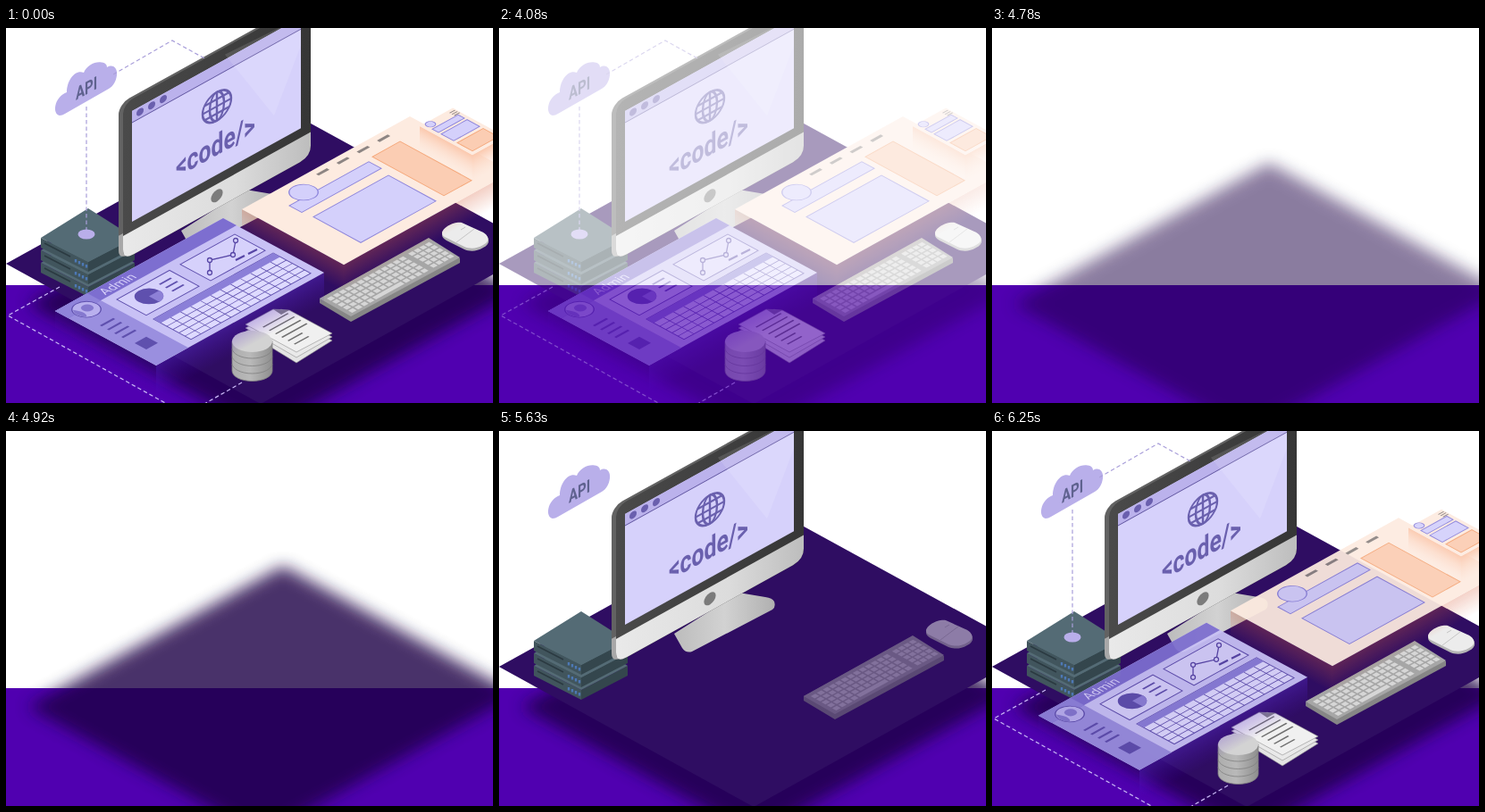
Recreate the animation shown at these times as an HTML page. Size 545 by 420 pixels, loop 6320 ms.

```html
<!DOCTYPE html>
<html lang="en">
<head>
<meta charset="utf-8">
<style>
html, body { margin: 0; height: 100%; overflow: hidden; background: #fff }
svg { display: block; width: 100vw; height: 100vh }
text { font-family: Roboto, Arial, sans-serif; font-weight: 700 }
</style>
</head>
<body>
<svg viewBox="0 0 545 420">
<defs>
  <filter id="blur" x="-20%" y="-20%" width="140%" height="140%"><feGaussianBlur stdDeviation="9"/></filter>
  <linearGradient id="chin"><stop stop-color="#e9e9e9"/><stop offset=".6" stop-color="#dcdcdc"/><stop offset="1" stop-color="#bdbdbd"/></linearGradient>
  <linearGradient id="bezel"><stop stop-color="#4a4a4a"/><stop offset="1" stop-color="#363636"/></linearGradient>
  <linearGradient id="stand"><stop stop-color="#bcbcbc"/><stop offset=".5" stop-color="#d2d2d2"/><stop offset="1" stop-color="#b0b0b0"/></linearGradient>
  <linearGradient id="disk"><stop stop-color="#adadad"/><stop offset=".45" stop-color="#b9b9b9"/><stop offset="1" stop-color="#8e8e8e"/></linearGradient>
  <linearGradient id="violet" x2="0" y2="1"><stop stop-color="#5a2cd0" stop-opacity=".4"/><stop offset="1" stop-color="#4a10c0" stop-opacity="0"/></linearGradient>
  <linearGradient id="ember" x2="0" y2="1"><stop stop-color="#d8603c" stop-opacity=".3"/><stop offset="1" stop-color="#d8603c" stop-opacity="0"/></linearGradient>
  <linearGradient id="peach" x2="0" y2="1"><stop stop-color="#fbc8ad"/><stop offset="1" stop-color="#fddfd0" stop-opacity="0"/></linearGradient>
</defs>
<rect y="288" width="545" height="132" fill="#5000b0"/>
<g id="scene">
  <path id="shadow" d="M24 309 310 151 572 295 286 453z" fill="#1f0645" filter="url(#blur)"/>
  <path id="floor" d="M0 264 312 91 597 247 285 421z" fill="#2f0d62"/>

  <g id="server"></g>

  <g id="monitor">
    <path d="M196 227 205 243Q209 249 216 247L306 200Q310 197 308 191 306 187 298 186L268 181z" fill="url(#stand)"/>
    <g transform="matrix(1 -.5545 0 1 131 0)">
      <rect x="-5" y="82.500" width="210" height="175" rx="12" fill="#626262"/>
      <path d="M-5 230h20v27h-9q-11 0-11-11z" fill="#a8a8a8"/>
      <rect y="85" width="210" height="175" rx="11" fill="url(#bezel)"/>
      <path d="M0 233h210v15q0 12-12 12H12q-12 0-12-12z" fill="url(#chin)"/>
      <path d="M10 98.500h189v124H10z" fill="#d6d1fb"/>
      <path d="M10 98.500h189v13H10z" fill="#bbb2ec"/>
      <path d="M10 111.500h189" stroke="#5f549f"/>
      <g fill="#6a5fae"><circle cx="19" cy="104.500" r="4"/><circle cx="32" cy="104.500" r="4"/><circle cx="45" cy="104.500" r="4"/></g>
      <path d="M114 93 169 192 199 130V98z" fill="#fff" opacity=".12"/>
      <g fill="none" stroke="#6a60ae" stroke-width="2.400">
        <circle cx="105" cy="146" r="16"/><ellipse cx="105" cy="146" rx="8" ry="16"/>
        <path d="M105 130v32M89 146h32M92 138h26M92 154h26"/>
      </g>
      <circle cx="105" cy="246" r="6.600" fill="#7b7b7b"/>
    </g>
    <text transform="matrix(.75 -.416 0 1 190 168)" font-size="33" fill="#6a60ae">&lt;code/&gt;</text>
  </g>

  <g id="cloud">
    <path d="M60 98C52 97 53 78 68 72 68 58 78 46 87 50 90 42 100 37 107 38.500 112 39 113 42 113 44 120 40 125 45 124 53 123 60 120 65 115 68L66 96Q63 98 60 98z" fill="#b9afea"/>
    <text transform="matrix(.75 -.416 0 1 78 81)" font-size="20" fill="#5f628f">API</text>
  </g>

  <g id="keys">
    <path d="M351 303 473 236 508 258V263L386 329 351 308z" fill="#868686"/>
    <path d="M351 303 473 235 508 257 386 323z" fill="#a6a6a6"/>
    <path id="caps" transform="matrix(1 -.5532 1 .56 351 303)" fill="#d6d6d6"/>
    <path d="M488 232C488 224 503 217 510 219L532 229C542 233 543 242 534 246 526 251 518 250 513 248L493 238Q488 235 488 232z" fill="#b5b5b5"/>
    <path d="M488 230C488 223 503 216 510 218L532 228C541 232 542 239 534 243 526 248 518 247 513 245L493 235Q488 233 488 230z" fill="#ececec"/>
    <path d="M504 240 524 225M509 226 514 223" fill="none" stroke="#c4c4c4"/>
  </g>

  <g id="docs">
    <g stroke="#8f8f8f" stroke-width=".6">
      <path d="M268 340 308 319 365 350 325 375z" fill="#e4e4e4"/>
      <path d="M268 336 308 315 365 346 325 369z" fill="#e9e9e9"/>
      <path d="M268 332 299 315 317 316 365 342 325 363z" fill="#f0f0f0"/>
    </g>
    <path d="M299 315 317 316 308 321z" fill="#858585"/>
    <path id="lines" transform="matrix(1 -.5532 1 .545 268 332)" fill="#707070"/>
    <g id="db"></g>
  </g>

  <g id="links" fill="none" stroke="#a99fda" stroke-width="1.200" stroke-dasharray="4.500 3">
    <path d="M90 88V226M120 52 186 14 224 35"/>
    <path d="M60 290 2 322 180 421M264 397 222 421" stroke="#c9b8f5"/>
    <ellipse cx="90" cy="231" rx="9.500" ry="5.500" fill="#b9aeea" stroke="none"/>
  </g>

  <g id="page">
    <rect transform="matrix(1 .545 0 1 264 203)" width="114" height="30" fill="url(#ember)"/>
    <rect transform="matrix(1 -.5532 0 1 378 265)" width="188" height="30" fill="url(#ember)"/>
    <g id="pageTop" transform="matrix(1 -.5532 1 .545 264 203)"></g>
    <rect transform="matrix(1 .545 0 1 463 110)" width="59" height="26" fill="url(#peach)"/>
    <rect transform="matrix(1 -.5532 0 1 522 142)" width="37" height="30" fill="url(#peach)"/>
    <g id="miniTop" transform="matrix(1 -.5532 1 .545 463 110)"></g>
  </g>

  <g id="admin">
    <rect transform="matrix(1 .54 0 1 55 317)" width="113" height="30" fill="url(#violet)" opacity=".25"/>
    <rect transform="matrix(1 -.5532 0 1 168 378)" width="188" height="36" fill="url(#violet)"/>
    <g id="adminTop" transform="matrix(1 -.5532 1 .54 55 317)"></g>
    <g fill="none" stroke="#5746a6" stroke-width="1.300">
      <path d="M228 274V260L254 254 257 238"/>
      <g fill="#d6d1fb"><circle cx="228" cy="274" r="2.500"/><circle cx="228" cy="260" r="2.500"/><circle cx="254" cy="254" r="2.500"/><circle cx="257" cy="238" r="2.500"/></g>
      <path d="M257 260 267 255M271 253 281 248" stroke-width="2.200"/>
    </g>
  </g>
</g>
</svg>
<script>
const $ = id => document.getElementById(id);
const box = (x, y, w, h) => `M${x} ${y}h${w}v${h}h${-w}z`;
const rect = (x, y, w, h, fill, stroke = 'none') => `<path d="${box(x, y, w, h)}" fill="${fill}" stroke="${stroke}"/>`;
const disc = (x, y, r, fill, stroke = 'none') => `<circle cx="${x}" cy="${y}" r="${r}" fill="${fill}" stroke="${stroke}"/>`;
const list = (n, f) => Array.from({ length: n }, (_, i) => f(i)).join('');

$('server').innerHTML = list(3, i => {
  const y = 27 - i * 14;
  return `<g transform="translate(0 ${y})">
    <path d="M39 236 92 263V274L39 247z" fill="#41555d"/>
    <path d="M92 263 144 236V247L92 274z" fill="#34464d"/>
    <path d="M39 236 92 203 144 236 92 263z" fill="#546b75"/>
    <path d="M43 242 72 257" stroke="#2b3a41" stroke-width="1.500"/>
    <path d="M78 260v3.500M82 262v3.500M86 264v3.500M90 266v3.500" stroke="#4d78b4" stroke-width="2.400"/></g>`;
});

$('caps').setAttribute('d', list(5, r =>
  list(13, c => r == 4 && c > 3 && c < 9 ? '' : box(4 + c * 6.7, 4 + r * 6, 5, 4.4)) +
  list(4, c => box(95 + c * 6.2, 4 + r * 6, 4.8, 4.4))) + box(30.8, 28, 31.8, 4.4));

$('lines').setAttribute('d', list(6, i => box(7, 12 + i * 7, i > 3 ? 16 : 28, 1.5)));

$('db').innerHTML = list(4, i => {
  const y = 384 - i * 8.5;
  return `<path d="M253 ${y - 8}V${y}a22.500 11.500 0 0 0 45 0V${y - 8}z" fill="url(#disk)" stroke="#808080" stroke-width=".8"/>`;
}) + '<ellipse cx="275.500" cy="351" rx="22.500" ry="12" fill="#d3d3d3"/>';

const blue = '#d4d0fb', rim = '#8f87dc', peach = '#fbcdb3', orange = '#f5a97c';
$('pageTop').innerHTML = rect(0, 0, 188, 114, '#fdebe0') +
  list(4, i => rect(77 + i * 22.7, 6, 12, 3, '#8d8583')) +
  rect(30, 23, 89, 14, blue, rim) + disc(51.5, 17.5, 11.5, blue, rim) +
  rect(32, 48, 84, 53, blue, rim) + rect(126, 20, 31, 80, peach, orange);

$('miniTop').innerHTML = rect(0, 0, 37, 59, '#fdebe0') +
  list(3, i => rect(30, 3 + i * 2.6, 6, 1, '#8d8583')) +
  rect(4, 10, 29, 7, blue, rim) + disc(8, 4, 4, blue, rim) +
  rect(4, 20, 29, 14, blue, rim) + rect(4, 38, 29, 17, peach, orange);

const ink = '#5f50ae', pale = '#d6d1fb';
$('adminTop').innerHTML = rect(0, 0, 188, 113, '#c8c1f5') +
  rect(0, 0, 36, 113, '#9a8fdf') + rect(0, 0, 188, 15, '#7d6ed0') + rect(0, 0, 36, 15, '#8f83da') +
  '<text x="44" y="12" font-size="12.500" style="font-weight:400" fill="#d8d2fa">Admin</text>' +
  disc(19, 16, 11.5, '#b9b0ee', ink) + disc(21, 15, 5, '#8578cf') +
  '<path d="M11 9A11.500 11.500 0 0 0 11 24Q17 20 11 9z" fill="#8578cf"/>' +
  list(4, i => rect(10, 40 + i * 8, 15, 2.2, ink)) + rect(11, 78, 13, 13, ink) +
  rect(46, 23, 59, 33, pale, ink) + rect(117, 23, 61, 34, pale, ink) +
  disc(67, 38, 11.5, ink) + '<path d="M67 38V49.500A11.500 11.500 0 0 0 78.500 38z" fill="#8d80d6"/>' +
  list(3, i => rect(85, 31 + i * 7, 13, 1.8, ink)) +
  rect(46, 64, 134, 42, '#dedaff', ink) + rect(46, 64, 134, 8, '#8b7fd8') +
  `<path d="${list(4, i => `M46 ${78.8 + i * 6.8}h134`)}${list(11, i => `M${57.2 + i * 11.2} 72v34`)}" stroke="${ink}" stroke-width=".8"/>`;

// Share of n steps done, the first one at time `start`
const steps = (t, start, dt, n) => Math.max(0, Math.min(1, (Math.floor((t - start) / dt) + 1) / n));
const easeOut = p => 1 - (1 - p) ** 1.7;

// id: start, step length, step count, starting offset, easing
const entries = {
  floor: [5080, 70, 3, 0, -82, p => p],
  monitor: [5290, 67.5, 3, -38, -24, easeOut],
  server: [5425, 67.5, 3, 0, -20, easeOut],
  cloud: [5425, 67.5, 3, 0, -15, easeOut],
  keys: [5595, 67.5, 3, -20, -12, easeOut],
  docs: [5763, 67.5, 3, 0, -20, easeOut],
  links: [5980, 67.5, 3, 0, 0, easeOut],
  page: [6045, 67.5, 5, 46, -28, easeOut],
  admin: [6045, 67.5, 5, -46, 28, easeOut]
};

function draw(now) {
  const t = now % 6320, leaving = t < 4500;
  $('scene').setAttribute('opacity', leaving ? 1 - steps(t, 3720, 40, 17) : 1);
  const shade = leaving ? 1 : steps(t, 4620, 40, 9) - .045;
  $('shadow').setAttribute('opacity', Math.max(0, Math.min(.8, shade)));
  for (const id in entries) {
    const [start, dt, n, x, y, ease] = entries[id];
    const p = leaving ? 1 : ease(steps(t, start, dt, n));
    $(id).setAttribute('opacity', p);
    $(id).setAttribute('transform', `translate(${x * (1 - p)} ${y * (1 - p)})`);
  }
}

let begin;
function loop(now) {
  begin ??= now;
  draw(now - begin);
  requestAnimationFrame(loop);
}
draw(0);
requestAnimationFrame(loop);
</script>
</body>
</html>
```
